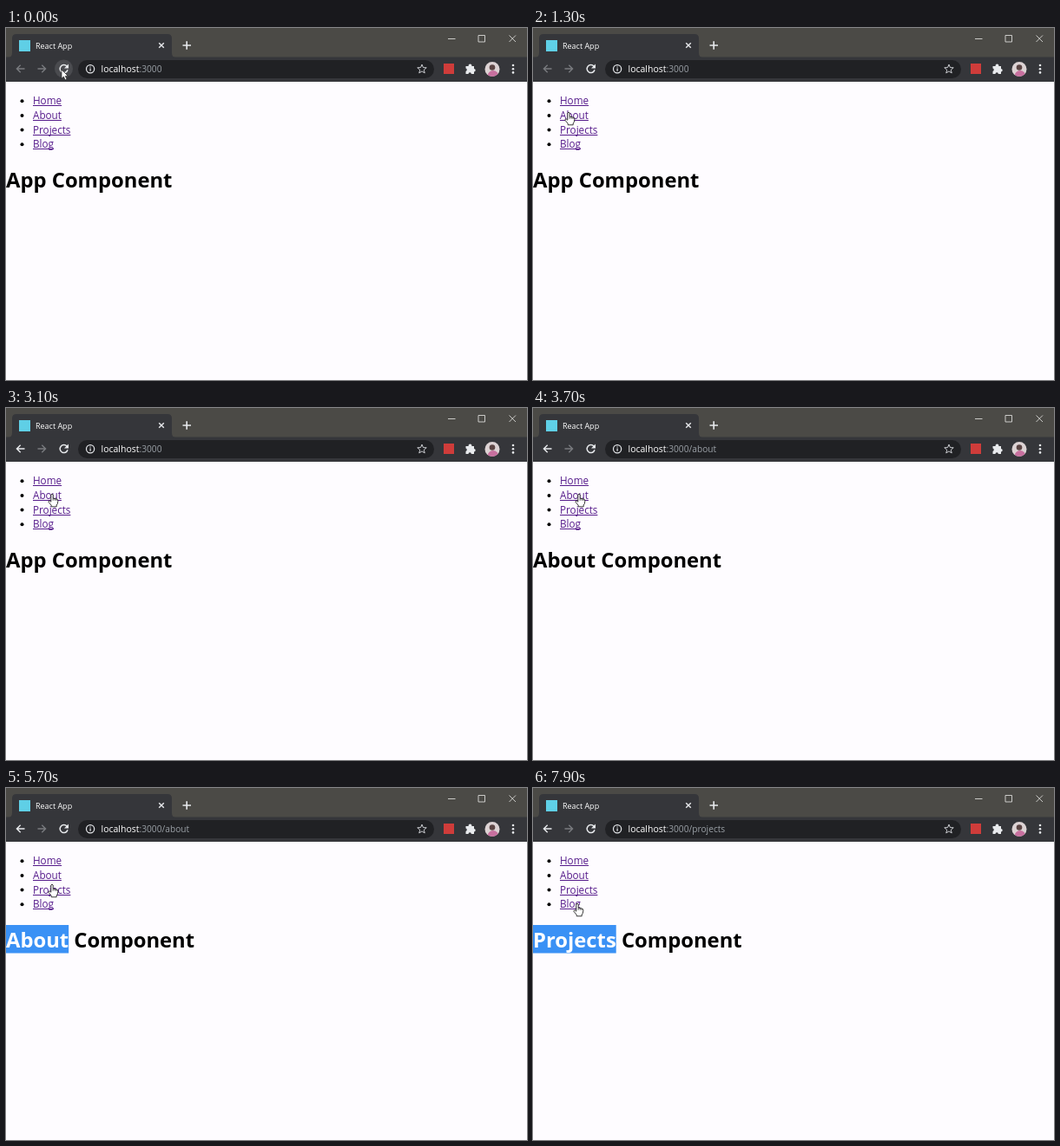
An HTML page with a canvas for the animation above (8 s loop, 600x406 px).

```html
<!DOCTYPE html>
<html lang="en">
<head>
<meta charset="utf-8">
<title>Router demo</title>
<style>
  html, body { margin: 0; width: 100%; height: 100%; overflow: hidden; background: #fefcff; }
  canvas { display: block; width: 600px; height: 406px; }
</style>
</head>
<body>
<canvas id="stage" width="600" height="406"></canvas>
<script>
const ctx = document.getElementById('stage').getContext('2d');
const LOOP = 8000, STEP = 100;
const FONT = '"Open Sans", "Noto Sans", sans-serif';
const LIGHT = '#e8eaed', DIM = '#797b7f', BAR = '#35363a', PAGE = '#fefcff', LINK = '#551a8b';
const LINKS = ['Home', 'About', 'Projects', 'Blog'];
const LINK_SIZE = 11.7, HEAD_SIZE = 23.8;

// Pointer hot spot: time, x, y
const PATH = [
  [0, 64, 48], [500, 64, 48], [900, 57, 68], [1300, 41, 97], [1700, 43, 94],
  [2100, 48, 84], [2500, 49, 82], [2800, 49, 83], [3100, 53, 99], [3800, 53, 99],
  [4100, 42, 145], [4400, 27, 184], [4600, 24, 178], [5300, 24, 175],
  [5700, 53, 111], [6300, 53, 111], [6800, 40, 173], [7100, 40, 173],
  [7400, 22, 176], [7700, 22, 176], [7900, 51, 133]
];

// Page state from the given time on
const STATES = [
  { at: 0, title: 'App', path: '' },
  { at: 300, title: 'App', path: '', loading: true },
  { at: 500, title: '', path: '', loading: true },
  { at: 1000, title: 'App', path: '' },
  { at: 2300, title: 'App', path: '', back: true },
  { at: 3300, title: 'About', path: '/about', back: true },
  { at: 5000, title: 'About', path: '/about', back: true, selected: true },
  { at: 5900, title: 'Projects', path: '/projects', back: true },
  { at: 7400, title: 'Projects', path: '/projects', back: true, selected: true }
];

function pointerAt(t) {
  const i = PATH.findIndex(p => p[0] > t);
  if (i < 0) return PATH[PATH.length - 1].slice(1);
  const [t0, x0, y0] = PATH[i - 1], [t1, x1, y1] = PATH[i];
  const u = (t - t0) / (t1 - t0), k = u * u * (3 - 2 * u);
  return [x0 + (x1 - x0) * k, y0 + (y1 - y0) * k];
}

function rect(x, y, w, h, color) {
  ctx.fillStyle = color;
  ctx.fillRect(x, y, w, h);
}

function disc(x, y, r, color) {
  ctx.fillStyle = color;
  ctx.beginPath();
  ctx.arc(x, y, r, 0, Math.PI * 2);
  ctx.fill();
}

function stroke(d, color, width = 1.3) {
  ctx.strokeStyle = color;
  ctx.lineWidth = width;
  ctx.stroke(new Path2D(d));
}

function fill(d, color) {
  ctx.fillStyle = color;
  ctx.fill(new Path2D(d));
}

function textWidth(s, size, weight = 400) {
  ctx.font = `${weight} ${size}px ${FONT}`;
  return ctx.measureText(s).width;
}

// Draws text and returns its width
function text(s, x, y, size, color, weight = 400) {
  const w = textWidth(s, size, weight);
  ctx.fillStyle = color;
  ctx.fillText(s, x, y);
  return w;
}

const rowY = i => 84 + i * 16.65;

function drawTabs(state, t) {
  rect(0, 0, 600, 34, '#4b4a46');
  fill('M2 34Q7 34 7 29V12Q7 7 12 7H186Q191 7 191 12V29Q191 34 196 34Z', BAR);
  if (state.loading) {
    const a = t / 130;
    ctx.strokeStyle = '#8ab4f8';
    ctx.lineWidth = 1.5;
    ctx.beginPath();
    ctx.arc(21.5, 20.5, 5, a, a + 4);
    ctx.stroke();
  } else {
    rect(15, 14, 13, 13, '#5fcfe6');
  }
  text('React App', 34, 23.6, 9, '#fff');
  stroke('M176.2 17.2l5.6 5.6m0-5.6l-5.6 5.6', LIGHT, 1.4);
  stroke('M203.5 20h9.5M208.2 15.3v9.4', LIGHT, 1.6);
  stroke('M509 12.5h8.5M544 8.5h7.5v7.5h-7.5zM579.5 8.5l7.5 7.5m0-7.5l-7.5 7.5', '#d8d8d6', 0.9);
}

function drawReload(state, t) {
  if (t < 700) disc(66.5, 47, 10.5, '#4a4b4f');
  if (state.loading) {
    stroke('M62.5 43l8 8m0-8l-8 8', LIGHT, 1.5);
    return;
  }
  stroke('M70.2 44.3A4.5 4.5 0 1 0 71 48.3', LIGHT, 1.5);
  fill('M72 41.5v5h-5z', LIGHT);
}

function drawStar(x, y) {
  ctx.beginPath();
  for (let i = 0; i < 10; i++) {
    const r = i % 2 ? 2.4 : 5.5, a = i * Math.PI / 5 - Math.PI / 2;
    ctx.lineTo(x + r * Math.cos(a), y + r * Math.sin(a));
  }
  ctx.closePath();
  ctx.strokeStyle = '#c9cbcf';
  ctx.lineWidth = 1;
  ctx.stroke();
}

function drawAvatar(x, y) {
  ctx.save();
  ctx.beginPath();
  ctx.arc(x, y, 8.5, 0, Math.PI * 2);
  ctx.clip();
  rect(x - 9, y - 9, 18, 18, '#ddd3d4');
  disc(x + 1, y + 8, 6.5, '#c8709f');
  disc(x, y - 2, 3.3, '#5c4544');
  ctx.restore();
}

function drawToolbar(state, t) {
  rect(0, 33.5, 600, 28.5, BAR);
  stroke('M21.5 47h-9m4.2-4.3L12.4 47l4.3 4.3', state.back ? LIGHT : DIM, 1.4);
  stroke('M36.5 47h9m-4.2-4.3l4.3 4.3l-4.3 4.3', DIM, 1.4);
  drawReload(state, t);

  ctx.fillStyle = '#202124';
  ctx.beginPath();
  ctx.roundRect(83, 37, 410, 21, 10.5);
  ctx.fill();
  stroke('M92.5 47.3a4.6 4.6 0 1 0 9.2 0a4.6 4.6 0 1 0-9.2 0M97.1 46.6v3.2M97.1 44.4v1.2', LIGHT, 1.2);
  const w = text('localhost', 109.5, 51.2, 10.5, '#fff');
  text(':3000' + state.path, 109.5 + w, 51.2, 10.2, '#9aa0a6');
  drawStar(479, 47.5);

  rect(504, 41, 12, 12, state.loading ? '#8c8d90' : '#cf3c3a');
  fill('M529.5 44h3.2a1.9 1.9 0 1 1 3.6 0H539v3a1.7 1.7 0 1 1 0 3.4V53h-3.1a1.7 1.7 0 0 0-3.4 0h-3v-3.1a1.7 1.7 0 0 0 0-3.3z', LIGHT);
  drawAvatar(560, 47.5);
  for (const y of [43, 47.2, 51.4]) disc(584, y, 1.3, LIGHT);
}

function drawPage(state) {
  rect(0, 62, 600, 344, PAGE);
  if (!state.title) return;
  LINKS.forEach((name, i) => {
    const y = rowY(i);
    disc(18.5, y + 0.3, 2, '#000');
    const w = text(name, 31, y + 4.3, LINK_SIZE, LINK);
    rect(31, Math.round(y + 5.3), w, 1, LINK);
  });
  const w = textWidth(state.title, HEAD_SIZE, 700);
  if (state.selected) rect(0, 158, w, 32.5, '#3a91f5');
  text(state.title, 0, 184, HEAD_SIZE, state.selected ? '#fff' : '#000', 700);
  text(' Component', w, 184, HEAD_SIZE, '#000', 700);
}

const SHAPES = {
  arrow: 'M0 0V10.3L2.4 8.1L4.1 11.9L6 11L4.3 7.4H7.4Z',
  hand: 'M-1.2 1Q0-.8 1.2 1V5.2L4.8 5.8Q7 6.2 6.9 8.2L6.3 11.5L5.2 13V14.8H-.8V13.2L-4 9.4Q-4.3 7.8-2.6 8.1L-1.2 9.2Z'
};

function pointerKind(x, y, state) {
  if (!state.title) return 'arrow';
  const over = LINKS.some((name, i) =>
    Math.abs(y - rowY(i)) < 7.6 && x >= 31 && x <= 31 + textWidth(name, LINK_SIZE));
  return over ? 'hand' : y > 158 && y < 191 ? 'beam' : 'arrow';
}

function drawPointer(t, state) {
  const [x, y] = pointerAt(t);
  const kind = pointerKind(x, y, state);
  ctx.save();
  ctx.translate(Math.round(x), Math.round(y));
  if (kind === 'beam') {
    stroke('M-2.5-5.5h2l.5.5l.5-.5h2M0-5V5M-2.5 5.5h2l.5-.5l.5.5h2', '#777', 1);
  } else {
    const hand = kind === 'hand';
    fill(SHAPES[kind], '#fff');
    stroke(SHAPES[kind], '#222', hand ? 0.9 : 0.7);
    if (hand) stroke('M1.2 5.2v2.6M3.2 5.6v2.2M5 6v2', '#222', 0.7);
  }
  ctx.restore();
}

function draw(now) {
  const t = Math.floor((now % LOOP) / STEP) * STEP;
  const state = STATES.filter(s => s.at <= t).pop();
  drawPage(state);
  drawTabs(state, t);
  drawToolbar(state, t);
  drawPointer(t, state);
}

const start = performance.now();
function tick() {
  draw(performance.now() - start);
  requestAnimationFrame(tick);
}
tick();
</script>
</body>
</html>
```
